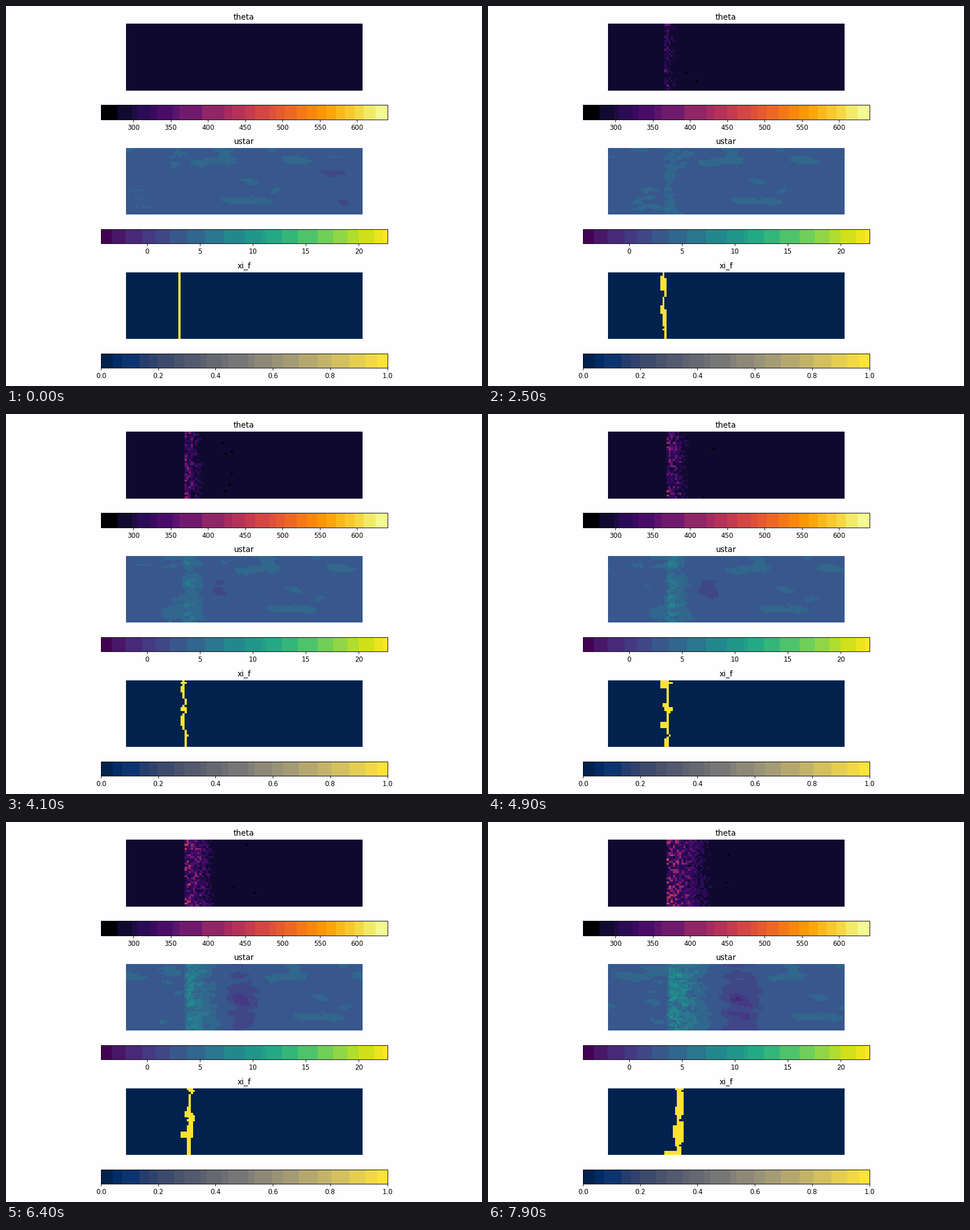
These frames come from a looping animation (837 px wide and 669 px high, 8000 ms). A matplotlib script:

```python
import numpy as np
import matplotlib.pyplot as plt
from matplotlib.animation import FuncAnimation
from matplotlib.colors import ListedColormap

W, H, DPI = 837, 669, 100
ROWS, COLS = 32, 113
SCALE = 0.837
LAST = 77
BAR_L, BAR_R = 167, 670.5

rng = np.random.default_rng(12)
y, x = np.mgrid[0:ROWS, 0:COLS].astype(float)


def banded(name, edges):
    """Step version of a colormap; edges are positions along the bar."""
    edges = np.array([BAR_L] + edges + [BAR_R])
    mids = (edges[:-1] + edges[1:]) / 2
    mids[0] = BAR_L
    pos = np.linspace(BAR_L, BAR_R, 504)
    band = np.clip(np.searchsorted(edges, pos, "right") - 1, 0, len(mids) - 1)
    frac = (mids - BAR_L) / (BAR_R - BAR_L)
    return ListedColormap(plt.get_cmap(name)(frac[band]))


def smooth(sx, sy):
    """Periodic Gaussian-filtered noise with unit deviation."""
    fx = np.fft.fftfreq(COLS)
    fy = np.fft.fftfreq(ROWS)[:, None]
    gain = np.exp(-2 * np.pi**2 * ((sx * fx) ** 2 + (sy * fy) ** 2))
    out = np.fft.ifft2(np.fft.fft2(rng.normal(size=(ROWS, COLS))) * gain).real
    return out / out.std()


def shift(field, dx):
    n = int(dx)
    f = dx - n
    return (1 - f) * np.roll(field, n, 1) + f * np.roll(field, n + 1, 1)


class Flicker:
    """Per-cell uniform noise that drifts slowly in time."""

    def __init__(self, slow, fast):
        self.phase = rng.random((ROWS, COLS))
        self.rate = rng.uniform(slow, fast, (ROWS, COLS))

    def at(self, step):
        return np.abs(2 * ((self.phase + self.rate * step) % 1) - 1)


heat, edge, gap, cold = (Flicker(0.03, 0.09) for _ in range(4))


def theta(step):
    q = step / LAST
    back = round(26 + 2 * min(1, 1.8 * q))
    u = (x - back) / (3 + 16 * q**1.3)
    near = np.clip(1 - u, 0, 1) ** 1.2
    power = 2 + 2.2 * (1 - q) ** 1.5
    out = 288 + 190 * q**0.6 * heat.at(step) ** power * near
    ragged = 1 - u + 0.5 * (edge.at(step) - 0.5)
    out += 18 * ((ragged > 1.3 - 1.18 * q) & (gap.at(step) > 0.2))
    out[u < 0] = 288
    chill = (0.03 * (1 - q) ** 2 + 0.003) * (step > 0)
    out[(u > 1) & (u < 2.4) & (cold.at(step) < chill)] = 265
    return out


def blob(cx, cy, sx, sy):
    dx = (x - cx + COLS / 2) % COLS - COLS / 2
    return np.exp(-((dx / sx) ** 2) - ((y - cy) / sy) ** 2)


calm = (3.2 + 0.27 * smooth(3, 0.9) + 0.06 * rng.normal(size=(ROWS, COLS))
        + 0.6 * blob(22, 3, 10, 3) + 0.65 * blob(42, 6, 14, 4)
        + 0.5 * blob(85, 4, 26, 3.5) + 0.55 * blob(65, 15, 14, 2.8)
        + 0.6 * blob(54, 26, 13, 3.5) + 0.5 * blob(8, 22, 7, 3)
        - 0.35 * blob(18, 15, 18, 5))
lull = (1.3 * blob(101, 12, 13, 2.2) + 1.2 * blob(105, 26, 9, 2.5)
        + 0.9 * blob(3, 10, 3, 1.5) + 0.5 * blob(2, 30, 5, 1.2))
streak, patch = smooth(1.0, 0.5), smooth(3, 1.2)
gust = Flicker(0.02, 0.06)


def ustar(step):
    q = step / LAST
    dx = 0.54 * step
    out = shift(calm, dx) - shift(lull, dx) * np.exp(-step / 16)

    back = 26.5 + 2 * q
    u = (x - back) / (3 + 13 * q**1.3)
    plume = np.exp(-1.6 * np.clip(u, 0, None) ** 2)
    plume *= np.clip((x - back + 1) / 2, 0, 1)
    rough = 0.5 + 0.7 * gust.at(step) + 0.3 * shift(streak, 0.4 * step)
    out += 5 * q**1.1 * plume * np.clip(rough, 0, 2)

    spread = 0.8 * np.clip((q - 0.45) / 0.45, 0, 1)
    rows = spread + (1 - spread) * np.exp(-((y - 14) / 4) ** 2)
    dip = np.exp(-((x - 33 - 29 * q**1.4) / (2 + 9 * q**2)) ** 2) * rows
    deep = np.clip(4 * (q - 0.2), 0, 2.4)
    out -= deep * dip * (1 + 0.3 * shift(patch, dx))
    return out + 0.5 * q * np.exp(-((x - 21) / 7) ** 2)


# Patches that keep burning: first row, end row, column, start, end.
EMBERS = [
    (17, 20, 25, 14, 30), (3, 6, 26, 30, 44), (17, 22, 26, 30, 45),
    (0, 4, 25, 46, 58), (11, 13, 26, 46, 60), (20, 23, 25, 45, 58),
    (21, 24, 26, 59, 72), (11, 14, 28, 61, 72), (30, 32, 27, 73, 77),
]
KEYS = [0, 9, 23, 39, 54, 69, 77]
HEAD = [25, 25.9, 26.6, 28, 29.4, 31.8, 33.8]
TAIL = [25, 25.3, 26, 27.3, 28.6, 30.3, 32.4]

block = np.cumsum(rng.random(ROWS) < 0.42)
wave = rng.uniform(0, 2 * np.pi, (2, ROWS))[:, block]
pace = rng.uniform(0.05, 0.12, (2, ROWS))[:, block]


def fire(step):
    sway = min(1, step / 30) * np.sin(wave + pace * step)
    first = np.round(np.interp(step, KEYS, TAIL) + sway[0])
    last = np.round(np.interp(step, KEYS, HEAD) + sway[1])
    first = np.maximum(25, np.minimum(first, last))
    last = np.maximum(first, last)
    for top, end, col, start, stop in EMBERS:
        if start <= step <= stop:
            first[top:end] = np.minimum(first[top:end], col)
    return ((x >= first[:, None]) & (x <= last[:, None])).astype(float)


plt.rcParams["font.family"] = "DejaVu Sans"
fig = plt.figure(figsize=((W + 0.01) / DPI, (H + 0.01) / DPI), dpi=DPI,
                 facecolor="#fefefe")


def box(left, top, right, bottom):
    return fig.add_axes([left / W, 1 - bottom / H,
                         (right - left) / W, (bottom - top) / H])


def panel(title, top, field, cmap, low, high, ticks):
    ax = box(211, top, 626, top + 117.5)
    ax.set_axis_off()
    ax.set_title(title, fontsize=12 * SCALE, pad=6 * SCALE)
    img = ax.imshow(field(0), cmap=cmap, vmin=low, vmax=high, aspect="auto",
                    interpolation="nearest")
    cax = box(BAR_L, top + 143.3, BAR_R, top + 168.4)
    bar = fig.colorbar(img, cax=cax, orientation="horizontal", ticks=ticks)
    bar.outline.set_linewidth(0.8 * SCALE)
    cax.tick_params(labelsize=10 * SCALE, length=3.5 * SCALE,
                    width=0.8 * SCALE, pad=3.5 * SCALE)
    return img, field


inferno = banded("inferno", [
    196, 222, 230, 254, 265, 293, 305, 345, 384, 398, 420, 438, 463, 474,
    490, 511, 529, 547, 564, 580, 596, 613, 629, 650])
viridis = banded("viridis", [
    186, 210, 240, 262, 288, 318, 350, 383, 420, 450, 457, 485, 513,
    548, 575, 600, 620, 647, 663])
cividis = banded("cividis", [
    188, 204, 235, 251, 267, 296, 314, 342, 353, 379, 391, 426, 437, 468,
    487, 515, 548, 572, 604, 632, 653])

panels = [
    panel("theta", 31.2, theta, inferno, 256.5, 640.5, range(300, 601, 50)),
    panel("ustar", 249.9, ustar, viridis, -4.36, 22.7, range(0, 21, 5)),
    panel("xi_f", 468.7, fire, cividis, 0, 1, np.linspace(0, 1, 6)),
]


def draw(i):
    step = max(0, i - 2)
    for img, field in panels:
        img.set_data(field(step))
    return [img for img, _ in panels]


anim = FuncAnimation(fig, draw, frames=80, interval=100, repeat=True,
                     repeat_delay=0, blit=False)
plt.show()
```
